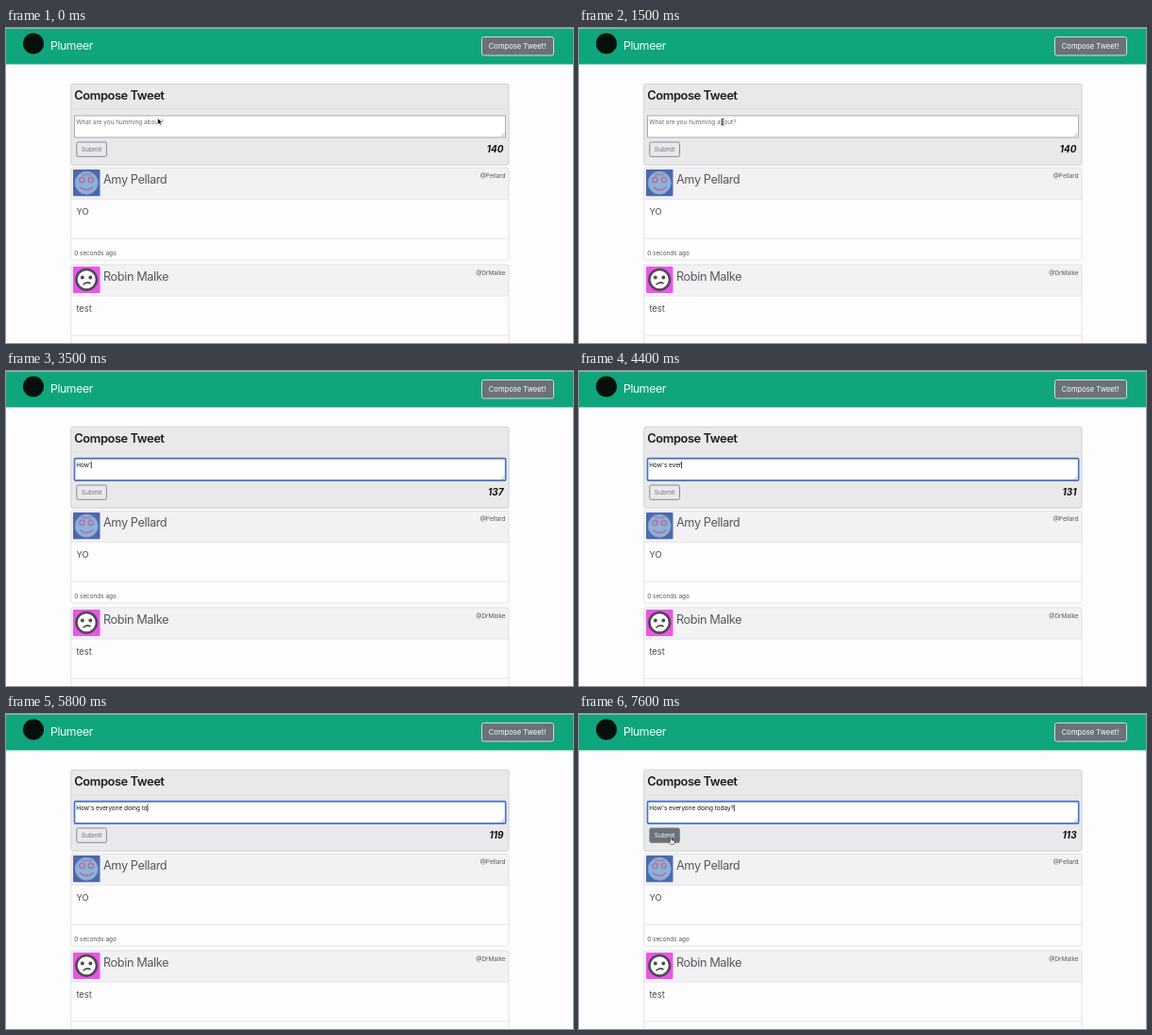
Recreate the animation shown at these times as an HTML page. Size 600 by 334 pixels, loop 8000 ms.

```html
<!DOCTYPE html>
<html lang="en">
<head>
<meta charset="utf-8">
<title>Compose</title>
<style>
html, body { margin: 0; width: 100%; height: 100%; overflow: hidden; background: #fdfcfe; }
svg { display: block; width: 100vw; height: 100vh; }
text { font-family: Inter, "Liberation Sans", sans-serif; fill: #55585d; white-space: pre; }
.brand { font-size: 12.2px; letter-spacing: -.03em; fill: #f4fffb; }
.head { font-size: 12.8px; font-weight: 600; letter-spacing: -.03em; fill: #1b1c1f; }
.name { font-size: 12.7px; letter-spacing: -.03em; }
.small { font-size: 6.4px; }
.body { font-size: 9.3px; fill: #4a4c50; }
.btn { font-size: 6.6px; }
.count { font-size: 10px; font-weight: 700; font-style: italic; fill: #111; }
.end { text-anchor: end; }
</style>
</head>
<body>
<svg viewBox="0 0 600 334" xmlns="http://www.w3.org/2000/svg">
  <rect width="600" height="334" fill="#fdfcfe"/>
  <rect width="600" height="38.5" fill="#0fa57d"/>
  <rect width="600" height="1" fill="#7fb5a4"/>
  <circle cx="29" cy="16.5" r="11" fill="#05100c"/>
  <text class="brand" x="47" y="22.6">Plumeer</text>
  <rect x="503.5" y="9.5" width="76" height="19.5" rx="2" fill="#6b717a" stroke="#d3dcdb"/>
  <text x="510.8" y="22" font-size="7.6" style="fill:#fff">Compose Tweet!</text>

  <rect x="68.7" y="59.3" width="463.4" height="86" rx="2" fill="#e9e8ea" stroke="#cbcacd" stroke-width=".8"/>
  <text class="head" x="72.3" y="76">Compose Tweet</text>
  <path d="M72.5 86H528.5" stroke="#d7d6d9" stroke-width=".8"/>
  <rect x="72.5" y="93" width="456" height="23" fill="#fff" stroke="#a5a5a8" stroke-width=".9"/>
  <path d="M524 115L527.5 111.5M526 115L527.5 113.5" stroke="#77777a" stroke-width=".5"/>
  <rect id="focus" x="72.5" y="92.7" width="456.2" height="23.4" rx="1.2" fill="none" stroke="#4678c8" stroke-width="1.7"/>
  <text id="hint" class="small" x="74.3" y="102" style="fill:#6a6b6f">What are you humming about?</text>
  <text id="entry" class="small" x="74.3" y="102" style="fill:#111"></text>
  <rect id="caret" y="96" width=".8" height="7.4" fill="#111"/>
  <rect id="submit" x="74.8" y="121" width="31.6" height="15.3" rx="1.6" fill="#6b717a" stroke="#7b8087" stroke-width=".9"/>
  <text id="label" class="btn" x="79.8" y="131.1">Submit</text>
  <text id="count" class="count end" x="526.6" y="132.1"></text>

  <g id="posts"></g>

  <g id="mouse">
    <path id="arrow" d="M0 0V6.8L1.6 5.4L2.7 7.8L3.8 7.3L2.8 5L5 4.9Z" fill="#111" stroke="#fff" stroke-width=".5"/>
    <path id="beam" d="M-1.6 -3.4Q0 -3.4 0 -2.4Q0 -3.4 1.6 -3.4M0 -2.6V2.8M-1.6 3.6Q0 3.6 0 2.6Q0 3.6 1.6 3.6" fill="none" stroke="#222" stroke-width=".9"/>
    <path id="hand" d="M-.8 0Q0 -.8 .7 0V2.7L3.2 3.3Q4 3.6 3.8 4.6L3.2 7.2H-.6L-2.5 4.7Q-2.4 3.7 -.8 4.6Z" fill="#fff" stroke="#222" stroke-width=".6"/>
  </g>
</svg>
<script>
const LOOP = 8000, STEP = 100;
const MESSAGE = "How's everyone doing today?";
const $ = id => document.getElementById(id);

const avatars = [
  `<rect x="71" y="150" width="28.5" height="28.3" rx="1" fill="#5068ac"/>
   <circle cx="85.2" cy="164.2" r="12" fill="#87b4dc" stroke="#79a3d4"/>
   <g fill="none" stroke="#b9749f" stroke-width="1.7">
   <circle cx="80.5" cy="161" r="2.6"/><circle cx="89.8" cy="161" r="2.6"/>
   <path d="M78 168.5Q85.2 174.5 92.5 168.5M80 155.5H90.5"/></g>`,
  `<rect x="71" y="253" width="28.5" height="28" rx="1" fill="#ea55e8"/>
   <circle cx="85.2" cy="266.8" r="10.8" fill="#fafafa" stroke="#4d4a50" stroke-width="2.6"/>
   <g fill="#4d4a50"><circle cx="80.8" cy="264.5" r="1.9"/><circle cx="89.3" cy="264.5" r="1.9"/></g>
   <path d="M81.5 272.2Q85.5 268.2 89.5 271" fill="none" stroke="#4d4a50" stroke-width="1.6"/>`
];

function post(y, name, handle, body, avatar) {
  return `<rect x="68.7" y="${y}" width="463.4" height="97.8" rx="2" fill="#fdfcfe"/>
    <rect x="68.7" y="${y}" width="463.4" height="33.2" fill="#f2f1f3"/>
    <path d="M68.7 ${y + 33.2}H532.1M68.7 ${y + 75}H532.1" stroke="#e2e1e4" stroke-width=".8"/>
    <rect x="68.7" y="${y}" width="463.4" height="97.8" rx="2" fill="none" stroke="#dddce0" stroke-width=".8"/>
    ${avatar}
    <text class="name" x="103" y="${y + 17.1}">${name}</text>
    <text class="small end" x="528.5" y="${y + 10.7}">${handle}</text>
    <text class="body" x="74.4" y="${y + 49.8}">${body}</text>
    <text class="small" x="72.2" y="${y + 92.3}">0 seconds ago</text>`;
}
$("posts").innerHTML =
  post(148.3, "Amy Pellard", "@Pellard", "YO", avatars[0]) +
  post(250.9, "Robin Malke", "@DrMalke", "test", avatars[1]);

// Moment at which each character is pressed
const keys = [...MESSAGE].map((_, i) =>
  i < 4 ? [3000, 3200, 3300, 3500][i] :
  i < 18 ? 3700 + (i - 4) * 120 :
  i < 26 ? 5400 + (i - 18) * 90 : 6500);
const FOCUS = 2100;
const typedAt = t => keys.filter(k => k <= t).length;

// time, x, y
const path = [
  [0, 160.5, 95.5], [700, 154.5, 99], [900, 154, 99.3], [1700, 151.3, 99.6],
  [6900, 151.3, 99.6], [7200, 118, 116], [7500, 97.3, 131], [LOOP, 97.3, 131]
];
const clamp = v => Math.max(0, Math.min(1, v));

function mouseAt(t) {
  const i = path.findIndex(p => p[0] > t);
  const [a, b] = [path[i - 1], path[i]];
  const k = (t - a[0]) / (b[0] - a[0]);
  return [a[1] + (b[1] - a[1]) * k, a[2] + (b[2] - a[2]) * k];
}

const show = (id, on) => $(id).setAttribute("visibility", on ? "visible" : "hidden");

function draw(t) {
  const n = typedAt(t);
  $("entry").textContent = MESSAGE.slice(0, n);
  show("hint", n === 0);
  $("count").textContent = 140 - typedAt(t - 150);
  $("focus").setAttribute("opacity", clamp((t - 1800) / 300));

  const last = n ? keys[n - 1] : FOCUS;
  show("caret", t >= FOCUS && (t - last) % 1000 < 500);
  $("caret").setAttribute("x", 74.2 + (n ? $("entry").getComputedTextLength() : 0));

  const [x, y] = mouseAt(t);
  const hover = t > 7000 && x < 106.5 && y > 121;
  const beam = t >= 1000 && y < 116.5;
  const visible = t < keys[0] || t >= 7000;
  $("mouse").setAttribute("transform", `translate(${x} ${y})`);
  show("hand", visible && hover);
  show("beam", visible && beam);
  show("arrow", visible && !hover && !beam);
  $("submit").setAttribute("fill-opacity", hover ? clamp((t - 7250) / 200) : 0);
  $("label").style.fill = hover ? "#fff" : "#6b717a";
}

const start = performance.now();
function frame() {
  const t = (performance.now() - start) % LOOP;
  draw(Math.floor(t / STEP) * STEP);
  requestAnimationFrame(frame);
}
frame();
</script>
</body>
</html>
```
